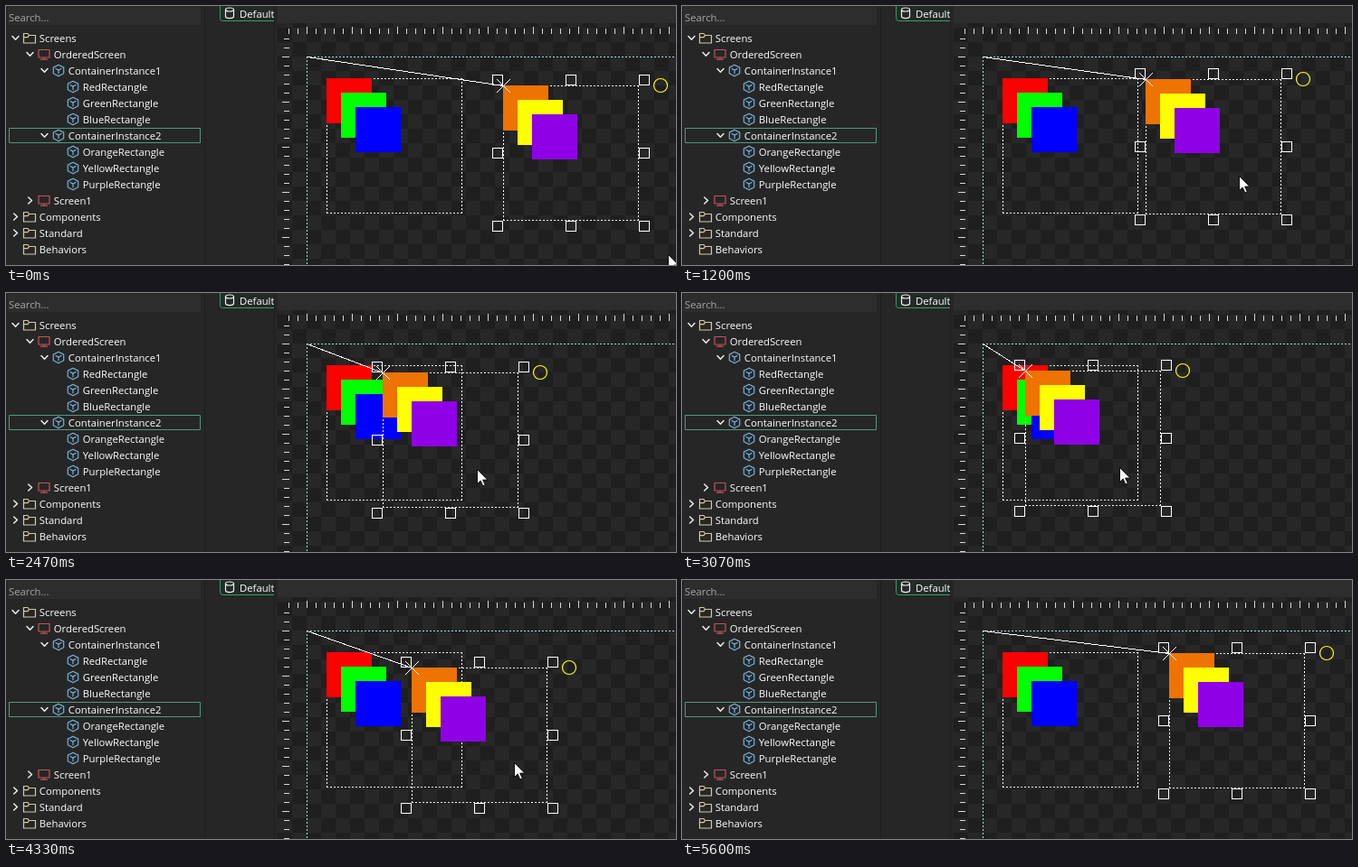
An HTML page that plays this animation: 740 px wide and 287 px high, repeating every 6.54 s.

```html
<!DOCTYPE html>
<html>
<head>
<meta charset="utf-8">
<style>
html, body { margin: 0; width: 100%; height: 100%; overflow: hidden; background: #262626; }
svg { display: block; width: 740px; height: 287px; }
text { font: 11.3px "Open Sans", "Noto Sans", sans-serif; fill: #fff; }
.dots { fill: none; stroke: #fff; stroke-dasharray: 2 2; }
.line { fill: none; stroke: #fff; shape-rendering: crispEdges; }
.icon { fill: none; stroke-width: 1.2; stroke-linejoin: round; stroke-linecap: round; }
</style>
</head>
<body>
<svg id="stage" viewBox="0 0 740 287">
  <defs>
    <pattern id="checker" x="332" y="56" width="32" height="32" patternUnits="userSpaceOnUse">
      <path d="M0 0h32v32H0z" fill="#272727"/>
      <path d="M0 0h16v16H0zM16 16h16v16H16z" fill="#1f1f1f"/>
    </pattern>
    <clipPath id="tabClip"><path d="M234 0h62v287h-62z"/></clipPath>
  </defs>

  <path d="M0 0h740v287H0z" fill="#262626"/>
  <path d="M2 1h213v20H2z" fill="#2d2d2d"/>
  <text x="3" y="16.500" style="fill:#a6a6a6">Search...</text>
  <path d="M3.500 135.500h211v16h-211z" fill="none" stroke="#4d9a80"/>
  <path d="M219.500 0v287M296.500 0v287" stroke="#1f1f1f"/>
  <g id="tree"></g>

  <g clip-path="url(#tabClip)">
    <rect x="236.5" y="-6" width="90" height="22.5" rx="3" fill="#232a27" stroke="#3c9a70"/>
    <g class="icon" stroke="#f0f0f0">
      <ellipse cx="247" cy="4" rx="4.5" ry="2"/>
      <path d="M242.500 4v7.500c0 2.700 9 2.700 9 0v-7.500"/>
    </g>
    <text x="258" y="12.500">Default</text>
  </g>

  <path d="M300 0h440v19H300z" fill="#2d2d2d"/>
  <path d="M300 19h440v268H300z" fill="url(#checker)"/>
  <path id="ticks" stroke="#d8d8d8"/>
  <path class="dots" d="M332 56.500H740M332.500 56V287" style="stroke:#a9dde0"/>
  <g id="boxA"></g>
  <g id="boxB"></g>
  <path id="link" class="line"/>
  <g id="handles">
    <path class="line" d="M-7 -7L8 8M-7 8L8 -7"/>
    <circle cx="174" cy="0" r="7.5" fill="none" stroke="#ffff00" stroke-width="1.2"/>
    <path id="hover" class="line" d="M-1.500 -1.500h153v153h-153z"/>
  </g>
  <path id="cursor" d="M.5 .5v16l3.700-3.500 2.600 5.900 2.500-1.100-2.600-5.700h5.200z" fill="#fff" stroke="#000" stroke-width=".9"/>
</svg>
<script>
const $ = id => document.getElementById(id);
const LOOP = 6540, LAG = 35, GRAB = [106.5, 107];

// Icons are centred on 0,0.
const icons = {
  folder: ["#d9c9a0", "M-6.500 5.500v-10.500h4.500l1.500 2h7v8.500zM-6.500 -.8h4.500l1.500 -2"],
  screen: ["#c4535c", "M-6 -5h12v8.500h-12zM-3.500 5.700h7M0 3.500v2"],
  cube: ["#74b2da", "M0 -6.300L5.700 -3.400V3.200L0 6.300L-5.700 3.200V-3.400zM-3 -2L0 -.4L3 -2M0 -.4V3.300"]
};
const arrows = { open: "M-3.500 -2L0 1.800L3.500 -2", shut: "M-1.800 -3.500L2 0L-1.800 3.500" };

const rows = [
  [0, "folder", "Screens", "open"],
  [1, "screen", "OrderedScreen", "open"],
  [2, "cube", "ContainerInstance1", "open"],
  [3, "cube", "RedRectangle"],
  [3, "cube", "GreenRectangle"],
  [3, "cube", "BlueRectangle"],
  [2, "cube", "ContainerInstance2", "open"],
  [3, "cube", "OrangeRectangle"],
  [3, "cube", "YellowRectangle"],
  [3, "cube", "PurpleRectangle"],
  [1, "screen", "Screen1", "shut"],
  [0, "folder", "Components", "shut"],
  [0, "folder", "Standard", "shut"],
  [0, "folder", "Behaviors"]
];

const glyph = (x, y, color, d, extra = "") =>
  `<path class="icon" transform="translate(${x} ${y})" stroke="${color}" d="${d}" ${extra}/>`;

$("tree").innerHTML = rows.map(([depth, icon, label, arrow], i) => {
  const x = depth * 16, y = 35.5 + i * 18;
  return (arrow ? glyph(x + 10.5, y, "#eee", arrows[arrow], 'style="stroke-width:1.5"') : "") +
    glyph(x + 26, y, ...icons[icon]) +
    `<text x="${x + 36.8}" y="${y + 4.3}">${label}</text>`;
}).join("");

let ticks = "";
for (let i = -2; i < 41; i++) {
  const size = i % 5 ? 6 : 8;
  const x = 332.5 + i * 10, y = 56.5 + i * 10;
  if (x > 312) ticks += `M${x} 31v${-size}`;
  if (y > 36 && y < 287) ticks += `M313 ${y}h${-size}`;
}
$("ticks").setAttribute("d", ticks);

function fillBox(id, colors) {
  const sides = "M0 .5h150M0 149.5h150M.5 0v150M149.5 0v150";
  $(id).innerHTML = `<path class="dots" d="${sides}"/>` + colors.map((c, i) =>
    `<rect x="${i * 16}" y="${i * 16}" width="50" height="50" fill="${c}"/>`).join("");
}
fillBox("boxA", ["#ff0000", "#00ff00", "#0000ff"]);
fillBox("boxB", ["#ee7300", "#ffff00", "#8f00e6"]);

const spots = [-6, 75, 156];
$("handles").insertAdjacentHTML("beforeend", spots.flatMap(x => spots.map(y =>
  x === 75 && y === 75 ? "" :
    `<rect class="line" x="${x - 5.5}" y="${y - 5.5}" width="11" height="11"/>`)).join(""));

// Rows: time, x, y
const drag = [
  [800, 549, 88], [1200, 512, 81], [1470, 492, 82], [1930, 461, 83],
  [2130, 437, 86], [2470, 416, 88], [2800, 393, 87], [3070, 379, 86],
  [3470, 363, 87], [3670, 360, 98], [3870, 369, 111], [3930, 376, 113],
  [4130, 410, 107], [4800, 522, 78], [5200, 538, 81]
];
const enter = [[0, 731, 275], [200, 695, 235], [400, 656, 195]];
const leave = [[5400, 645, 188], [5470, 520, 235], [5530, 283, 268]];

// Smooth interpolation that never overshoots a key.
function sample(keys, t, axis) {
  const last = keys.length - 1;
  if (t <= keys[0][0]) return keys[0][axis];
  if (t >= keys[last][0]) return keys[last][axis];
  const slope = i => (keys[i + 1][axis] - keys[i][axis]) / (keys[i + 1][0] - keys[i][0]);
  const tangent = i => {
    if (i === 0 || i === last) return 0;
    const a = slope(i - 1), b = slope(i);
    return a * b > 0 ? 2 * a * b / (a + b) : 0;
  };
  const i = keys.findIndex(k => k[0] > t) - 1;
  const h = keys[i + 1][0] - keys[i][0], u = (t - keys[i][0]) / h, v = 1 - u;
  return keys[i][axis] * (1 + 2 * u) * v * v + keys[i + 1][axis] * u * u * (3 - 2 * u) +
    h * u * v * (tangent(i) * v - tangent(i + 1) * u);
}
const at = (keys, t) => [1, 2].map(axis => Math.round(sample(keys, t, axis)));
const move = (id, [x, y]) => $(id).setAttribute("transform", `translate(${x} ${y})`);
const show = (id, on) => $(id).setAttribute("visibility", on ? "visible" : "hidden");

function pointer(t) {
  if (t < 670) return at(enter, t);
  if (t >= 5400) return at(leave, t);
  return at(drag, t + LAG).map((v, i) => Math.floor(v + GRAB[i]));
}

// Fifteen pictures a second, on a 10 ms clock.
function step(t) {
  const tick = k => Math.round(k * 20 / 3) * 10;
  const k = Math.floor((t + 4) * 3 / 200);
  return tick(k) > t ? tick(k - 1) : tick(k);
}

function draw(now) {
  const t = Math.max(0, step(now % LOOP));
  const pos = at(drag, t);
  move("boxB", pos);
  move("handles", pos);
  $("link").setAttribute("d", `M332.5 56.5L${pos[0] + 0.5} ${pos[1] + 0.5}`);
  move("cursor", pointer(t));
  show("cursor", t < 5600);
  show("hover", (t >= 200 && t < 670) || (t >= 5200 && t < 5530));
}

move("boxA", [354, 80]);
const start = performance.now();
function loop() {
  draw(performance.now() - start);
  requestAnimationFrame(loop);
}
loop();
</script>
</body>
</html>
```
